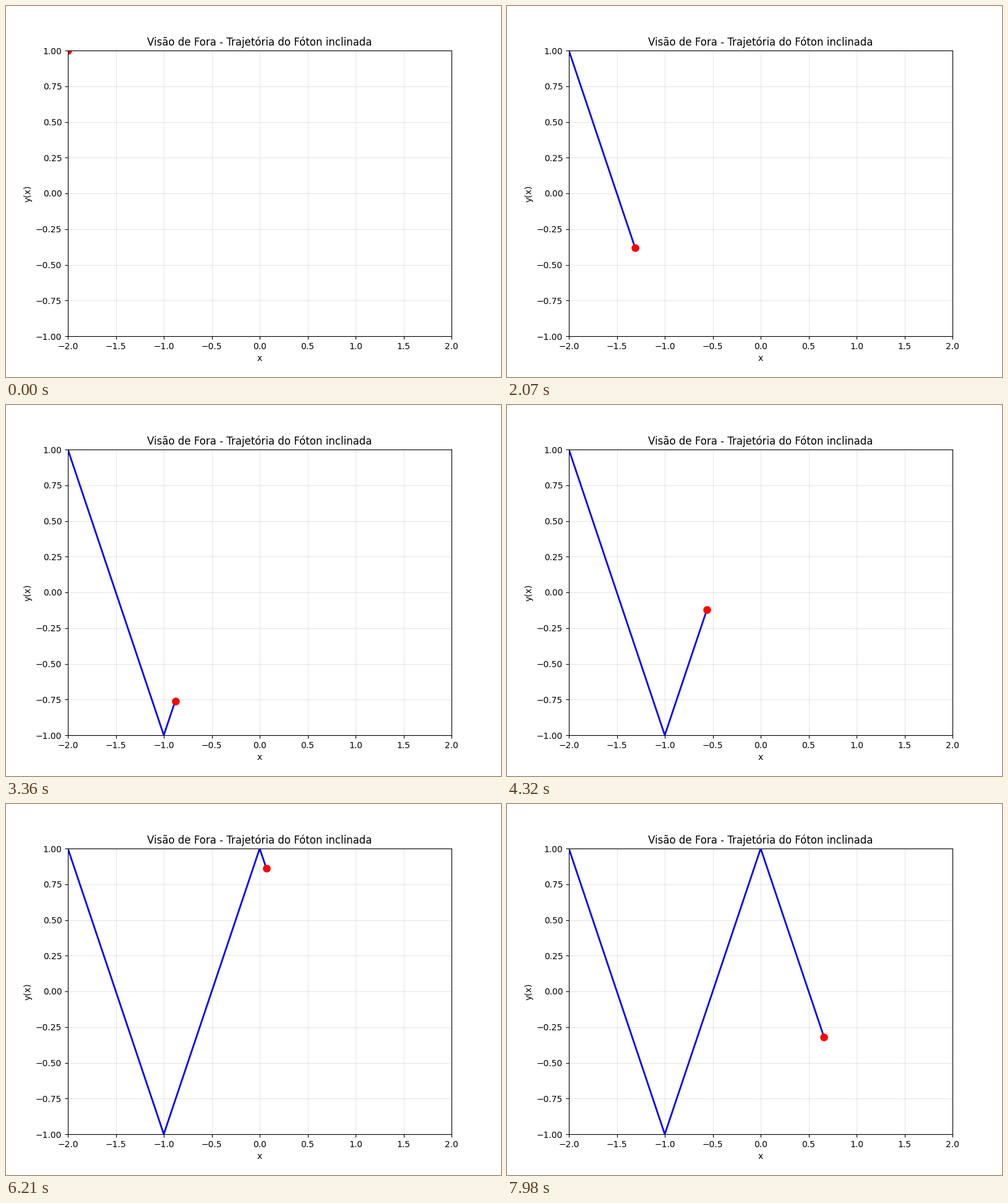
Write a matplotlib script that moves like this. It is 800 px wide and 600 px high and loops after 8000 ms.

```python
import numpy as np
import matplotlib.pyplot as plt
from matplotlib.animation import FuncAnimation

LOOP_MS = 8000
FRAMES = 267
STEP = 0.01  # distance along x per frame

# Zigzag between y = 1 and y = -1 with period 2 in x
u = np.arange(401) * STEP
x = u - 2
y = 2 * np.abs(u % 2 - 1) - 1

plt.rcParams["font.family"] = "DejaVu Sans"
fig, ax = plt.subplots(figsize=(8, 6), dpi=100)
ax.set_xlim(-2, 2)
ax.set_ylim(-1, 1)
ax.set_xlabel("x")
ax.set_ylabel("y(x)")
ax.set_title("Visão de Fora - Trajetória do Fóton inclinada")
ax.grid(alpha=0.3)

trail, = ax.plot([], [], color="blue", lw=2)
photon, = ax.plot([], [], "o", color="red", markersize=8)


def update(n):
    trail.set_data(x[:n + 1], y[:n + 1])
    photon.set_data([x[n]], [y[n]])
    return trail, photon


def init():
    return update(0)


anim = FuncAnimation(fig, update, frames=FRAMES, init_func=init,
                     interval=LOOP_MS / FRAMES, repeat=True,
                     repeat_delay=0, blit=False)
plt.show()
```
